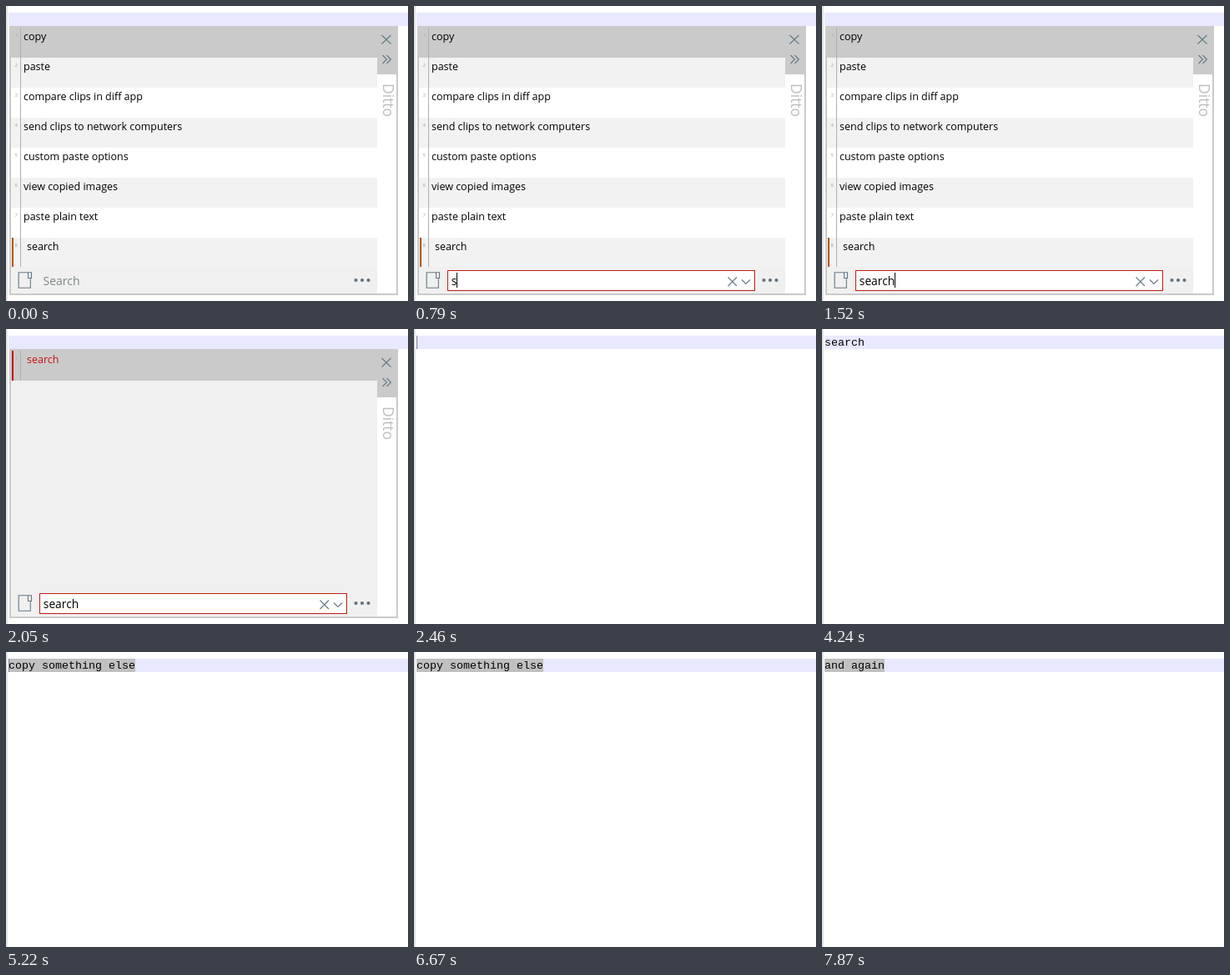
Recreate the animation shown at these times as an HTML page. Size 482x354 px, loop 8 s.

```html
<!DOCTYPE html>
<html lang="en">
<head>
<meta charset="utf-8">
<title>Clipboard search</title>
<style>
  html, body { margin: 0; width: 100%; height: 100%; overflow: hidden; background: #fff; }
  svg { display: block; width: 482px; height: 354px; }
  text { font-family: "Open Sans", "Noto Sans", sans-serif; font-variant-ligatures: none; white-space: pre; }
  .row { font-size: 12.5px; }
  .num { font-size: 6px; fill: #a3a3a3; }
  .field { font-size: 13.8px; }
  .code { font: 13.333px "Liberation Mono", "Courier New", monospace; }
  .icon { fill: none; stroke: #667985; stroke-width: 1.1; }
  .crisp { shape-rendering: crispEdges; }
</style>
</head>
<body>
<svg viewBox="0 0 482 354">
  <rect width="482" height="354" fill="#fff"/>
  <rect width="2" height="354" fill="#e4e4e4"/>
  <rect x="3" y="8" width="479" height="16" fill="#e8e8ff"/>

  <g id="editor">
    <rect id="selection" x="3" y="8" height="16" fill="#c0c0c0"/>
    <text id="line" class="code" x="3" y="20"></text>
    <rect id="caret" y="8" width="1" height="16" fill="#77778a"/>
  </g>

  <g id="popup">
    <rect x="4" y="24" width="466" height="323" fill="#cacaca"/>
    <rect x="6" y="62" width="439" height="283" fill="#f0f0f0"/>
    <rect x="445" y="82" width="23" height="263" fill="#fff"/>
    <g id="all"></g>
    <g id="match">
      <rect x="7" y="26" width="2" height="36" fill="#c00d0d"/>
      <rect x="17" y="26" width="1" height="36" fill="#b0b0b0"/>
      <text class="num" x="11" y="37">1</text>
      <text class="row" x="25" y="41" fill="#c80f0f">search</text>
    </g>

    <path class="icon" d="M450.500 35l11 10.500m0-10.500l-11 10.500M451.500 59l5 5-5 5M456.500 59l5 5-5 5"/>
    <text transform="translate(452 93) rotate(90)" font-size="17.500" fill="#bdbdbd">Ditto</text>

    <path class="icon" stroke-width="1.500" d="M26.500 319.700H15.200V338.300H29.300V327M26.500 319.700H30.500V326.500H26.500Z"/>
    <g fill="#62727e">
      <circle cx="419.500" cy="329" r="2.100"/>
      <circle cx="427" cy="329" r="2.100"/>
      <circle cx="434.500" cy="329" r="2.100"/>
    </g>
    <text id="hint" x="44.500" y="335" font-size="14" fill="#7d8886">Search</text>

    <g id="box">
      <rect class="crisp" x="40.500" y="317.500" width="368" height="24" fill="#fff" stroke="#c01c12"/>
      <text id="query" class="field" x="44.800" y="335"></text>
      <rect id="cursor" y="320" width="1" height="18" fill="#000"/>
      <path class="icon" d="M376.500 325.500l10.500 10.500m0-10.500l-10.500 10.500M393 328.500l5 5 5-5"/>
    </g>
  </g>
</svg>
<script>
  const LOOP = 8000, CHAR = 8;
  const $ = id => document.getElementById(id);
  const show = (id, on) => $(id).setAttribute("visibility", on ? "inherit" : "hidden");
  const within = (t, spans) => spans.some(([a, b]) => t >= a && t < b);

  const clips = ["copy", "paste", "compare clips in diff app", "send clips to network computers",
    "custom paste options", "view copied images", "paste plain text", "search"];

  $("all").innerHTML = clips.map((clip, i) => {
    const y = 26 + 36 * i, last = i === clips.length - 1;
    const fill = i === 0 ? "#cacaca" : i % 2 ? "#f2f2f2" : "#fff";
    return `<rect x="6" y="${y}" width="439" height="${last ? 35 : 36}" fill="${fill}"/>
      <text class="num" x="10.500" y="${y + 11}">${i + 1}</text>
      <text class="row" x="${last ? 25 : 21}" y="${y + 15}">${clip}</text>`;
  }).join("") + `<rect x="17" y="26" width="1" height="287" fill="#b0b0b0"/>
    <rect x="7" y="278" width="2" height="35" fill="#b3560f"/>`;

  const keyTimes = [790, 940, 1030, 1120, 1370, 1520];
  const caretOn = [[2460, 3080], [3650, 4240], [4860, 5470], [6060, 6670], [7160, 7870]];
  const edits = [
    { at: 2460, text: "" },
    { at: 2670, text: "search" },
    { at: 5220, text: "copy something else", selected: true },
    { at: 7160, text: "and again" },
    { at: 7260, text: "and again", selected: true }
  ];

  function drawPopup(t) {
    const typed = "search".slice(0, keyTimes.filter(k => t >= k).length);
    const filtered = t >= 1770;
    show("all", !filtered);
    show("match", filtered);
    show("hint", !typed);
    show("box", typed);
    $("query").textContent = typed;
    $("cursor").setAttribute("x", Math.floor(45 + $("query").getComputedTextLength()));
    show("cursor", typed && t < 2050);
  }

  function drawEditor(t) {
    const { text, selected } = edits.filter(e => t >= e.at).pop();
    const width = text.length * CHAR;
    $("line").textContent = text;
    $("selection").setAttribute("width", selected ? width : 0);
    $("caret").setAttribute("x", selected || !text ? 3 : 2 + width);
    show("caret", within(t, caretOn));
  }

  let start;
  function tick() {
    const now = performance.now();
    start ??= now;
    const t = (now - start) % LOOP, open = t < 2460;
    show("popup", open);
    show("editor", !open);
    if (open) {
      drawPopup(t);
    } else {
      drawEditor(t);
    }
    requestAnimationFrame(tick);
  }
  tick();
</script>
</body>
</html>
```
